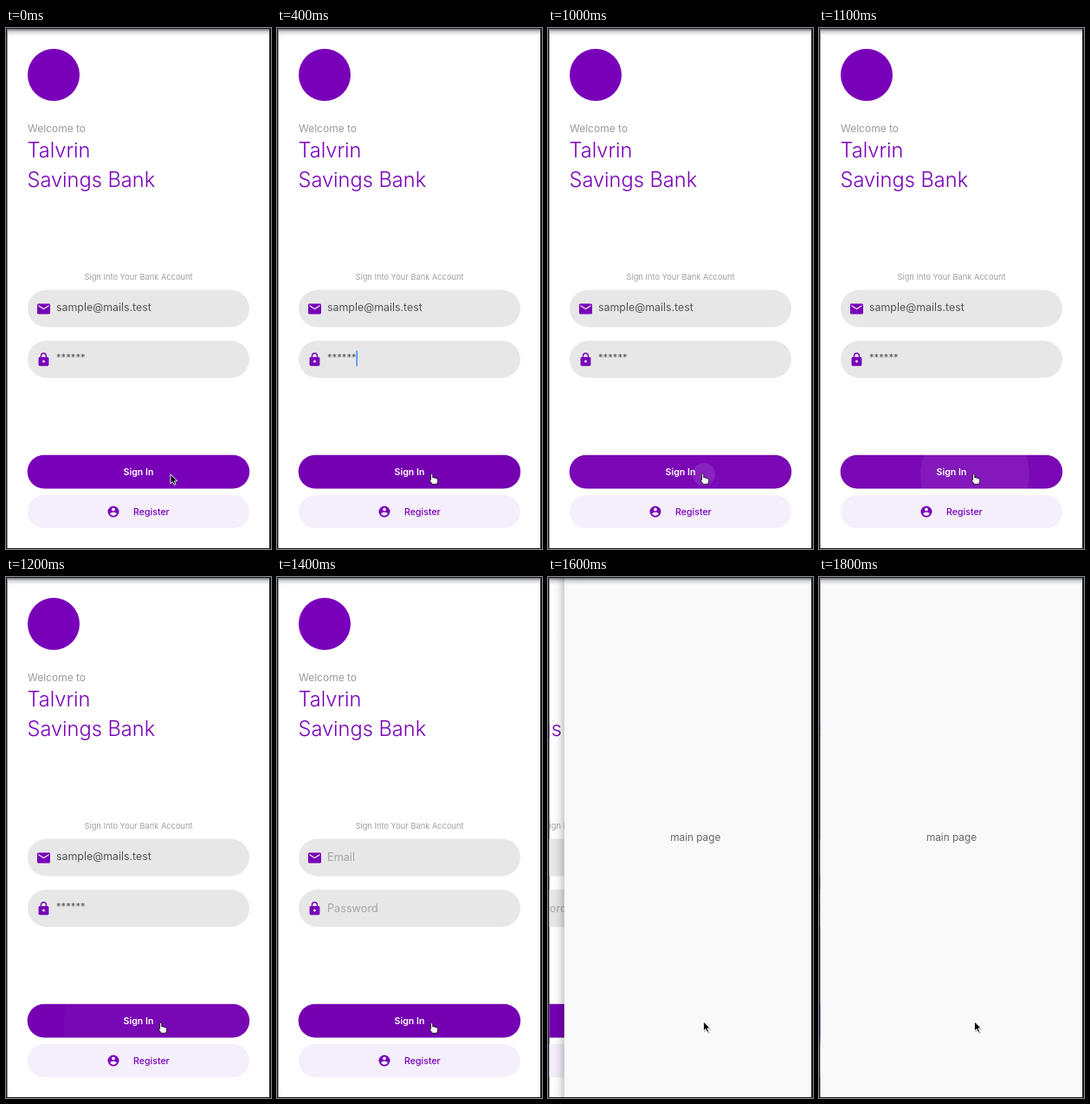
Recreate the animation shown at these times as an HTML page. Size 306 by 600 pixels, loop 2500 ms.

```html
<!DOCTYPE html>
<html lang="en">
<head>
<meta charset="utf-8">
<title>Sign in</title>
<style>
  html, body { margin: 0; width: 100%; height: 100%; overflow: hidden; background: #fff; }
  svg { display: block; font-family: Inter, "Open Sans", sans-serif; }
  .purple { fill: #7800b9; }
  .title { font-size: 23.6px; font-weight: 350; }
  .field { fill: #e7e7e7; }
  .value { font-size: 12.4px; fill: #555; }
  .hint { font-size: 12.7px; fill: #a6a6a6; }
  .label { font-size: 10.6px; }
</style>
</head>
<body>
<svg width="306" height="600" viewBox="0 0 306 600">
  <defs>
    <clipPath id="screen"><rect x="1.5" y="1" width="302.5" height="598"/></clipPath>
    <clipPath id="buttonClip"><rect x="24.7" y="491.7" width="256.5" height="38.7" rx="19.3"/></clipPath>
    <linearGradient id="edge">
      <stop offset="0" stop-opacity="0"/>
      <stop offset=".3" stop-opacity=".016"/>
      <stop offset=".6" stop-opacity=".07"/>
      <stop offset="1" stop-opacity=".22"/>
    </linearGradient>
    <linearGradient id="topShade" x2="0" y2="1">
      <stop offset="0" stop-color="#11141c" stop-opacity=".6"/>
      <stop offset=".4" stop-color="#11141c" stop-opacity=".18"/>
      <stop offset="1" stop-color="#11141c" stop-opacity="0"/>
    </linearGradient>
  </defs>

  <rect width="306" height="600" fill="#171c28"/>
  <g clip-path="url(#screen)">
    <rect width="306" height="600" fill="#fff"/>

    <g id="login">
      <circle class="purple" cx="55" cy="54" r="30"/>
      <text x="25" y="119.5" font-size="12" fill="#999">Welcome to</text>
      <text class="purple title" x="24.5" y="149">Talvrin</text>
      <text class="purple title" x="24.5" y="182.5">Savings Bank</text>
      <text x="153" y="290.3" font-size="9.3" fill="#a0a0a0" text-anchor="middle">Sign Into Your Bank Account</text>

      <rect class="field" x="25" y="301.5" width="256" height="43" rx="21.5"/>
      <rect class="field" x="25" y="360" width="256" height="43" rx="21.5"/>
      <path class="purple" transform="translate(34.5 314.5) scale(.75)" d="M20 4H4c-1.1 0-2 .9-2 2v12c0 1.1.9 2 2 2h16c1.1 0 2-.9 2-2V6c0-1.1-.9-2-2-2zm0 4l-8 5-8-5V6l8 5 8-5z"/>
      <path class="purple" transform="translate(34.6 373) scale(.74)" d="M18 8h-1V6c0-2.76-2.24-5-5-5S7 3.24 7 6v2H6c-1.1 0-2 .9-2 2v10c0 1.1.9 2 2 2h12c1.1 0 2-.9 2-2V10c0-1.1-.9-2-2-2zm-6 9c-1.1 0-2-.9-2-2s.9-2 2-2 2 .9 2 2-.9 2-2 2zm3.1-9H8.9V6c0-1.71 1.39-3.1 3.1-3.1s3.1 1.39 3.1 3.1z"/>

      <g id="filled" class="value">
        <text x="58" y="326.3">sample@mails.test</text>
        <text x="58" y="383.7" font-size="11.2">******</text>
      </g>
      <g id="empty" class="hint">
        <text x="58" y="327">Email</text>
        <text x="58" y="385.5">Password</text>
      </g>
      <rect id="caret" x="91.5" y="371.5" width="1.5" height="18" fill="#3f8cf0"/>

      <g clip-path="url(#buttonClip)">
        <rect id="button" x="24" y="491" width="258" height="40"/>
        <circle id="ripple" cx="180" cy="514" fill="#fff"/>
      </g>
      <text class="label" x="153" y="514.8" font-weight="600" fill="#fff" text-anchor="middle">Sign In</text>

      <rect x="25" y="538" width="256" height="38" rx="19" fill="#f5eefb"/>
      <path class="purple" transform="translate(116.2 549.2) scale(.65)" d="M12 2a10 10 0 1 0 0 20 10 10 0 1 0 0-20zm0 3a3 3 0 1 1 0 6 3 3 0 1 1 0-6zm0 14.2c-2.5 0-4.71-1.28-6-3.22.03-1.99 4-3.08 6-3.08 1.99 0 5.97 1.09 6 3.08-1.29 1.94-3.5 3.22-6 3.22z"/>
      <text class="purple label" x="147" y="560.5" font-weight="500">Register</text>
    </g>

    <g id="main">
      <rect x="-13" width="15" height="600" fill="url(#edge)"/>
      <rect x="1.5" width="303" height="600" fill="#f9f9f9"/>
      <text x="153" y="304" font-size="11.8" fill="#666" text-anchor="middle">main page</text>
    </g>
    <rect x="1.5" y="1" width="302.5" height="8" fill="url(#topShade)"/>
  </g>

  <g id="arrow" stroke-linejoin="round">
    <path d="M1 1.5v11l2.6-2.3 1.9 3.9 2-1-1.8-3.7h3.5z" opacity=".25"/>
    <path d="M0 0v10.8l2.5-2.3 1.8 3.9 1.8-.8-1.7-3.8h3.4z" stroke="#fff" stroke-width=".9"/>
  </g>
  <path id="hand" fill="#fff" stroke="#111" stroke-width=".9" stroke-linejoin="round"
    d="M-1.1 1Q0-.8 1.1 1V4.6Q2.4 3.6 3.2 5Q4.6 4.2 5.2 5.6Q7 5.2 7 7V9L5.8 12H.6L-2.6 7.6Q-2.6 6.2-1.1 7.2Z"/>
</svg>

<script>
const LOOP = 2500, STEP = 100, WIDTH = 302;
const PUSH_START = 1433, PUSH_TIME = 301;
const el = Object.fromEntries([...document.querySelectorAll('g[id], rect[id], circle[id], path[id]')].map(n => [n.id, n]));

const clamp = v => Math.min(1, Math.max(0, v));
const lerp = (a, b, k) => a + (b - a) * k;
const show = (node, on) => node.setAttribute('visibility', on ? 'visible' : 'hidden');
const move = (node, x, y = 0) => node.setAttribute('transform', `translate(${x} ${y})`);
const bezier = (a, b, u) => 3 * a * u * (1 - u) ** 2 + 3 * b * u * u * (1 - u) + u ** 3;

// cubic-bezier(.35, .91, .33, .97)
function easeOut(x) {
  if (x <= 0 || x >= 1) return clamp(x);
  let low = 0, high = 1;
  for (let i = 0; i < 24; i++) {
    const mid = (low + high) / 2;
    if (bezier(.35, .33, mid) < x) low = mid; else high = mid;
  }
  return bezier(.91, .97, low);
}

function draw(t) {
  const push = easeOut((t - PUSH_START) / PUSH_TIME);
  move(el.login, -push * WIDTH / 3);
  move(el.main, (1 - push) * WIDTH);
  show(el.main, push > 0);

  const cleared = t >= 1400;
  show(el.filled, !cleared);
  show(el.empty, cleared);
  show(el.caret, t >= 200 && t < 700);

  const pressed = t >= 900 && t < 1200;
  el.button.setAttribute('fill', t < 100 ? '#7800b9' : pressed ? '#7a08b5' : '#7400b2');
  const radius = t <= 1000 ? lerp(8, 13, (t - 900) / 100) : lerp(13, 113, (t - 1000) / 200);
  el.ripple.setAttribute('r', Math.max(0, radius));
  el.ripple.setAttribute('opacity', t < 900 || cleared ? 0 : lerp(.11, .03, clamp((t - 1000) / 200)));

  const glide = clamp(t / 300);
  const hovering = t >= 100 && t < 1500;
  show(el.hand, hovering);
  show(el.arrow, !hovering);
  move(el.hand, lerp(190, 178.7, glide), lerp(514.5, 513.3, glide));
  move(el.arrow, lerp(190, 179.5, glide), lerp(514, 512, glide));
}

function tick() {
  const t = performance.now() % LOOP;
  draw(Math.floor(t / STEP) * STEP);
  requestAnimationFrame(tick);
}
tick();
</script>
</body>
</html>
```
